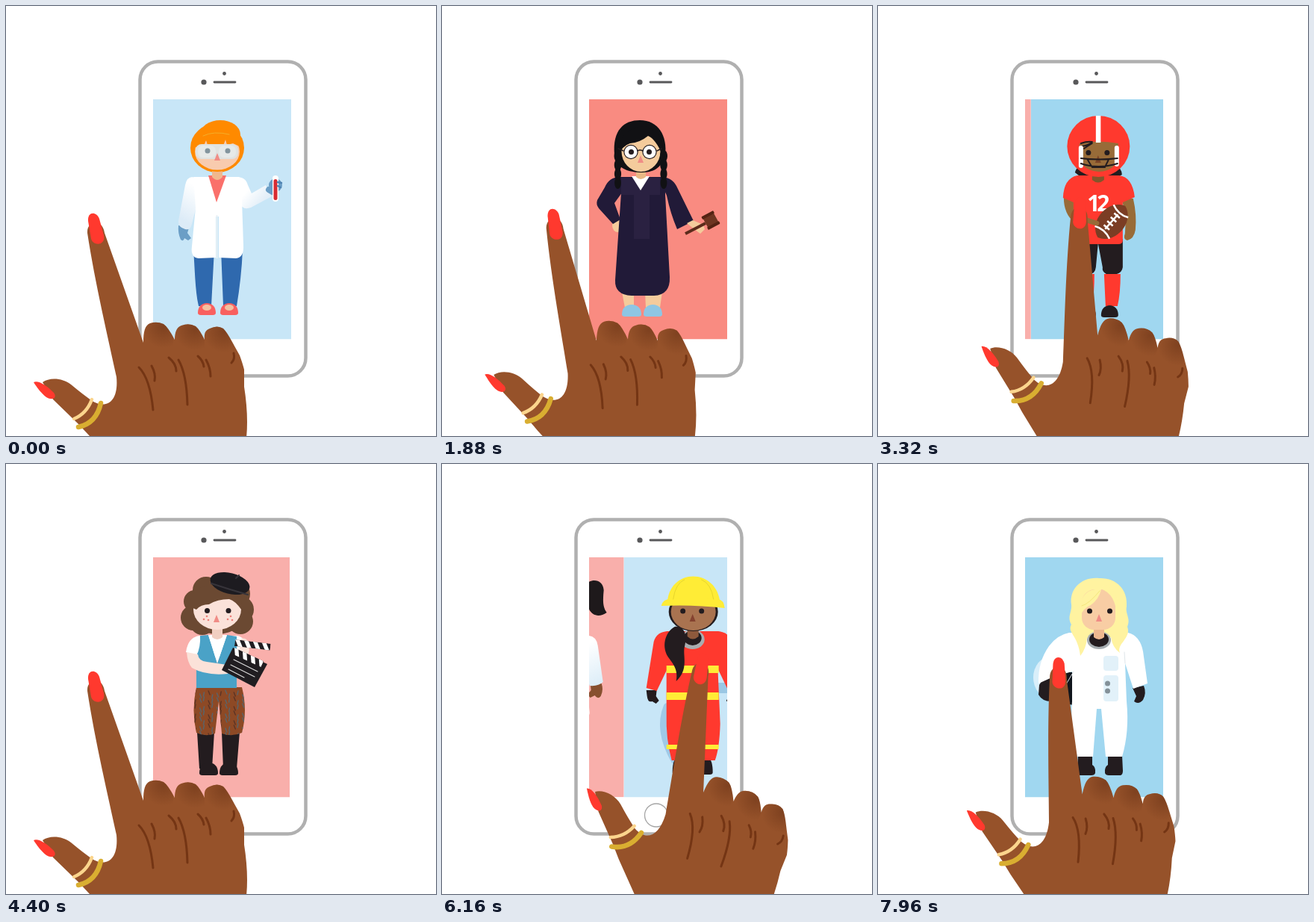
Animation of 576 by 576 pixels, one loop 8000 ms. Source, as an HTML page with a canvas:

```html
<!DOCTYPE html>
<html lang="en">
<head>
<meta charset="utf-8">
<title>Swiping through careers</title>
<style>
html, body { margin: 0; width: 100%; height: 100%; overflow: hidden; background: #fff; }
canvas { display: block; width: 576px; height: 576px; }
</style>
</head>
<body>
<canvas id="stage" width="576" height="576"></canvas>
<script>
const g = document.getElementById('stage').getContext('2d');
const LOOP = 8000, CYCLE = 1400, STEP = 40;
const RED = '#ff392e', WHITE = '#fff', INK = '#231c1f', CORAL = '#fa706b', BROWN = '#96522a';
const SKY = '#c8e6f7', BLUE = '#a0d7f0', PINK = '#f9afab', SALMON = '#f98b81';

// Drawing helpers
function shape(fill, d) { g.fillStyle = fill; g.fill(new Path2D(d)); }
function oval(fill, x, y, rx, ry = rx, turn = 0) {
  g.fillStyle = fill;
  g.beginPath();
  g.ellipse(x, y, rx, ry, turn, 0, Math.PI * 2);
  g.fill();
}
function box(fill, x, y, w, h, r = 0) {
  g.fillStyle = fill;
  g.beginPath();
  g.roundRect(x, y, w, h, r);
  g.fill();
}
function line(stroke, width, d, cap = 'round') {
  g.strokeStyle = stroke;
  g.lineWidth = width;
  g.lineCap = cap;
  g.lineJoin = 'round';
  g.stroke(new Path2D(d));
}
function shade(x0, y0, x1, y1, from, to) {
  const s = g.createLinearGradient(x0, y0, x1, y1);
  s.addColorStop(0, from);
  s.addColorStop(1, to);
  return s;
}
function mirror(axis, draw) {
  draw();
  g.save();
  g.translate(axis * 2, 0);
  g.scale(-1, 1);
  draw();
  g.restore();
}
function eyes(x1, x2, y, color = INK) {
  oval(color, x1, y, 3.5);
  oval(color, x2, y, 3.5);
}
function nose(x, y, color = '#f08c86') { shape(color, `M${x} ${y}l4 10h-8z`); }
function shoe(fill, x, y, w, h) {
  shape(fill, `M${x} ${y + h - 3}C${x} ${y + 5} ${x + 5} ${y} ${x + w / 2} ${y}S${x + w} ${y + 5} ${x + w} ${y + h - 3}Q${x + w} ${y + h} ${x + w - 4} ${y + h}H${x + 4}Q${x} ${y + h} ${x} ${y + h - 3}Z`);
}

function scientist() {
  oval('#ff8a00', 283, 190, 36, 33);
  oval('#ff8a00', 287, 172, 27, 19);
  shape('#2f69ae', 'M251 326H279L275 402H258C253 380 253 350 251 326ZM288 326H317C316 352 313 378 309 402H291Z');
  mirror(284, () => {
    shoe('#f9605f', 257, 398, 24, 16);
    oval('#f3c0a0', 269, 404, 6, 4);
  });
  shape('#6b9ec6', 'M231 294L246 294L243 304L248 311L244 314L239 311Q238 316 234 313Q230 304 231 294Z');
  shape(shade(234, 285, 260, 245, '#dcebf7', WHITE), 'M250 229Q242 229 240 240L231 288Q230 296 240 299Q247 301 249 292L262 240Z');
  shape(shade(345, 262, 325, 245, '#e2eef8', WHITE), 'M307 229Q321 228 324 240L329 251L348 240L356 255L328 270Q317 274 313 264L304 242Z');
  shape(WHITE, 'M251 229H312Q318 234 316 260L318 320Q319 337 308 338L285 337V282H281V337L258 338Q247 337 249 322L254 270Z');
  box('#e9f1f6', 281.5, 280, 2, 58);
  shape(CORAL, 'M271 227H295L282 263Z');
  shape('#f0b88e', 'M276 215H290V229Q283 237 276 229Z');
  oval('#ff8a00', 283, 197, 31, 25);
  oval('#f8cbae', 283, 195, 30, 24.5);
  shape('#ff8a00', 'M250 190C253 162 279 158 293 165C307 165 315 176 315 189L304 184L296 186L294 179L291 187L270 186L268 180L265 187Z');
  line('#f4ae2a', 1, 'M264 174Q278 167 299 172');
  box('#dfe2e1', 254, 185, 57, 20, 8);
  box('#e6e9e8', 257, 187, 24, 16, 7);
  box('#e6e9e8', 285, 187, 23, 16, 7);
  eyes(270, 297, 194, '#83949d');
  nose(283, 197);
  oval('#6b9ec6', 361, 240, 9, 9);
  line('#6b9ec6', 8, 'M352 246L357 249');
  box(WHITE, 357, 227, 8, 35, 4);
  box('#d92c32', 358.5, 232, 5, 28, 2.5);
  line('#4f84b2', 2.5, 'M364 236L369 237M364 241L368 243');
}

function judge() {
  const skin = '#f4cb9c', robe = '#211a38', hair = '#111114';
  shape(skin, 'M241 383H257V404H245ZM272 383H295L292 404H273Z');
  shoe('#8ec6e4', 241, 400, 26, 16);
  shoe('#8ec6e4', 270, 400, 25, 16);
  oval(skin, 235, 294, 7, 9);
  shape(robe, 'M238 229Q224 229 218 243L208 260Q206 266 210 271L229 292L239 286L231 264L244 246Z');
  shape(robe, 'M291 229Q307 228 314 241L337 288L315 299Q306 278 301 254Z');
  shape(skin, 'M328 291L336 287L350 293L352 299L346 305L338 299Z');
  shape(robe, 'M236 229H297Q303 238 299 252L305 363Q306 387 284 388H254Q231 387 232 367L240 250Z');
  shape('#2a2141', 'M240 230H292V253H278V312H257V253H240Z');
  shape(WHITE, 'M254 228H278L266 247Z');
  shape('#e9b985', 'M260 215H273V229Q266 235 260 229Z');
  shape(hair, 'M231 199C228 166 244 153 265 153C290 153 302 174 299 200C293 218 284 223 265 223C246 222 233 216 231 199Z');
  oval(skin, 266.5, 195, 26, 27);
  shape(hair, 'M236 194C238 163 272 155 282 166C293 171 298 186 295 199Q286 178 276 174Q265 183 252 184Q242 187 236 200Z');
  for (let i = 0; i < 4; i++) {
    oval(hair, 235.5, 201 + i * 12, 5 - i * .2, 8);
    oval(hair, 297, 201 + i * 12, 5 - i * .2, 8);
  }
  for (const x of [253, 278]) {
    oval(INK, x, 195.5, 9.7);
    oval(WHITE, x, 195.5, 8.5);
  }
  line(INK, 1.5, 'M262 194Q265 192 269 194M243 194L236 191M288 194L294 191');
  eyes(253.5, 277.5, 195.5);
  nose(266, 200);
  line('#5b2b1b', 4, 'M326 305L353 291', 'butt');
  g.save();
  g.translate(360, 287);
  g.rotate(-.5);
  box('#6e3521', -8, -8, 16, 16, 1);
  box('#542313', -9, -10, 18, 4, 1);
  box('#542313', -9, 6, 18, 4, 1);
  g.restore();
}

function player() {
  const skin = '#986b38';
  shape(INK, 'M257 312H320V350Q319 357 312 359H298Q292 356 293 350L287 318L284 350Q283 359 275 359H264Q257 356 257 345Z');
  shape(RED, 'M260 359H282Q282 385 279 402H265ZM295 359H317Q317 385 313 402H297Z');
  shoe(INK, 261, 401, 23, 16);
  shoe(INK, 291, 401, 23, 16);
  shape(skin, 'M241 257H255L261 276L281 284Q289 290 283 295Q276 299 255 290Q241 278 241 257Z');
  shape(skin, 'M319 258H334Q339 280 337 300Q335 312 326 314Q320 312 323 305L324 286Z');
  shape(INK, 'M256 223Q258 214 266 216L287 225L308 216Q318 214 319 226L304 234H270Z');
  shape(RED, 'M259 227H315Q333 229 336 256L320 263V314Q320 319 314 319H260Q254 318 254 313V263L240 257Q241 231 259 227Z');
  shape('#83562b', 'M279 215H295V233Q287 240 279 233Z');
  oval(RED, 287.5, 188, 42, 41);
  shape(skin, 'M262 184Q287 179 314 184V201Q311 221 288 222Q264 220 262 201Z');
  box(WHITE, 284, 147, 6.5, 36);
  line(INK, 2, 'M264 184Q272 181 279 182M265 188Q273 187 278 183M268 191Q274 187 279 184');
  box(WHITE, 261, 187, 6, 30, 3);
  box(WHITE, 309, 187, 6, 28, 3);
  eyes(274, 299, 196.5);
  nose(287, 200, '#7a4326');
  line(INK, 2, 'M264 204Q287 207 313 204M264 211Q287 219 313 211M273 206L279 216H296L301 206');
  g.fillStyle = WHITE;
  g.textAlign = 'center';
  g.font = 'bold extra-condensed 30px "Open Sans", "Noto Sans", "Liberation Sans", sans-serif';
  g.letterSpacing = '-4px';
  g.fillText('12', 285.5, 275);
  g.letterSpacing = '0px';
  g.save();
  g.translate(305, 289);
  g.rotate(-.85);
  shape('#7b3d24', 'M-28 0C-20 -24 20 -24 28 0C20 24 -20 24 -28 0Z');
  line(WHITE, 2.5, 'M-19 -13Q-13 0 -19 13M19 -13Q13 0 19 13M-13 0H13M-10 -5V5M-3 -5V5M4 -5V5M11 -5V5', 'butt');
  g.restore();
  line(skin, 7, 'M272 287L285 291');
}

function director() {
  const skin = '#fbe2d9', hair = '#6b4932';
  shape(INK, 'M256 359H279L276 408H259ZM289 359H313L309 408H291Z');
  shoe(INK, 259, 400, 25, 17);
  shoe(INK, 286, 400, 25, 17);
  const trousers = 'M255 299H316Q324 330 316 360Q303 366 289 361L285 318L280 361Q267 366 255 360Q248 330 255 299Z';
  shape('#8d4925', trousers);
  g.save();
  g.clip(new Path2D(trousers));
  for (let i = 0; i < 84; i++) {
    const x = 254 + i % 12 * 5.7, y = 303 + Math.floor(i / 12) * 9 + i * 5 % 7;
    line(i % 3 ? '#59646b' : '#5b3325', 1.4, `M${x} ${y}l${i % 2 ? 2 : -1} 5`);
  }
  g.restore();
  oval(hair, 283, 193, 42, 35);
  for (const [x, y, r] of [[268, 169, 18], [253, 184, 15], [251, 206, 17], [263, 212, 17], [306, 174, 21], [314, 195, 18], [314, 211, 17]])
    oval(hair, x, y, r);
  shape(WHITE, 'M259 230H309Q321 231 325 252L311 259H258L241 252Q244 232 259 230Z');
  shape('#4aa2c7', 'M260 230L271 229L283 267L296 229L309 231V300H255V257Q261 245 260 230Z');
  shape(WHITE, 'M271 229H296L283 267Z');
  shape(skin, 'M242 252L257 255Q258 264 269 265L296 269Q301 276 297 281Q268 284 249 273Q243 266 242 252Z');
  line(skin, 13, 'M318 240Q323 252 309 267');
  shape('#f1cfc1', 'M276 215H290V232Q283 238 276 232Z');
  oval(skin, 283, 195, 32, 27);
  shape(hair, 'M246 191C249 161 272 157 296 170C312 174 318 184 316 196Q307 183 299 181Q283 181 272 188Q261 188 255 195Z');
  oval('#1d1b20', 300, 160, 27, 14, .24);
  line('#37343a', 2, 'M308 153L312 149M275 160Q299 168 324 175');
  eyes(269.5, 298, 196.5);
  nose(282, 202);
  for (const x of [265, 297])
    for (const [dx, dy] of [[0, 4], [4, 0], [6, 5]]) oval('#ed7e78', x + dx, 204 + dy, 1.3);
  shape('#201d21', 'M304 246L350 268L333 299L289 276Z');
  line('#ddd', 1.1, 'M305 262L337 278M301 269L333 285M298 275L319 286');
  clapBar(307, 235, 48, .12);
  clapBar(306, 246, 43, .43);
}
function clapBar(x, y, length, turn) {
  g.save();
  g.translate(x, y);
  g.rotate(turn);
  g.beginPath();
  g.rect(0, 0, length, 9);
  g.clip();
  box('#201d21', 0, 0, length, 9);
  for (let i = 0; i < 5; i++) shape(WHITE, `M${i * 12} 0h6l5 9h-6z`);
  g.restore();
}

function firefighter() {
  const yellow = '#ffec36', skin = '#a97350';
  line('#9fc9e7', 10, 'M255 325Q242 357 265 397');
  box('#9ac7e4', 318, 293, 30, 14, 2);
  mirror(289, () => {
    shape(INK, 'M227 303H241L240 311L244 317L240 321L235 318Q229 320 228 311Z');
    shape(RED, 'M257 224Q241 224 237 238L227 300L241 304L262 260Z');
    shoe(INK, 262, 391, 25, 25);
  });
  shape(RED, 'M254 224H324Q331 250 323 280L326 348Q325 381 319 397H290L289 370L286 397H261Q253 368 254 335Z');
  for (const [y, h] of [[270, 10], [306, 10], [376, 6]]) box(yellow, 254, y, 70, h);
  oval('#a8adb0', 289, 235, 16, 13);
  oval(INK, 289, 233, 12, 10);
  shape('#8d593c', 'M282 215H297V231Q289 238 282 231Z');
  oval(INK, 290, 198, 33, 26);
  oval(skin, 290, 198, 30, 25);
  shape(yellow, 'M255 188C256 138 323 138 326 188Z');
  shape(yellow, 'M247 190Q249 181 259 181Q290 178 323 181Q331 182 332 193Q290 188 247 190Z');
  line('#e7d52c', 1, 'M263 181Q266 160 278 155M317 181Q314 160 301 155');
  eyes(276, 301, 197);
  nose(289, 201, '#84422f');
  shape(INK, 'M265 218C277 216 283 228 278 246C276 258 284 275 267 291C270 276 263 268 258 261C246 246 252 225 265 218Z');
}

function doctor() {
  const skin = '#87502f', hair = '#1e191b';
  mirror(284, () => {
    shape(hair, 'M256 164C249 152 231 153 230 169C231 181 232 191 226 199C239 208 252 201 252 183Z');
    shape(skin, 'M233 294H248L247 303L252 309L248 313L242 310Q238 316 234 311Q230 303 233 294Z');
    shape(skin, 'M256 355H277Q277 382 274 404H259Z');
    shoe('#f7423b', 258, 400, 25, 17);
    line(WHITE, 1.5, 'M266 404L275 410M275 404L266 410');
    shape('#14172d', 'M253 310H288L280 322L278 358Q265 363 255 356Z');
    shape(shade(235, 295, 260, 245, '#dcedf8', WHITE), 'M250 230Q240 231 238 243L231 292Q237 298 249 297L262 250Z');
  });
  box(CORAL, 270, 228, 28, 85);
  mirror(284, () => shape(WHITE, 'M250 230H272L274 338Q272 342 265 342Q249 342 249 333L254 282Z'));
  shape('#754326', 'M277 214H291V231Q284 238 277 231Z');
  oval(hair, 284, 187, 35, 32);
  oval(skin, 284, 196, 31, 25);
  shape(hair, 'M250 194C248 168 267 155 286 156C306 156 319 174 317 198Q309 183 298 178Q279 190 261 186Q255 190 250 194Z');
  eyes(270, 297, 196.5);
  nose(283, 201, '#b9343b');
  line('#777c82', 2.2, 'M273 229Q266 237 266 257M299 229Q304 245 300 270M300 271Q289 276 288 297M300 271Q309 281 304 300');
  oval('#a8b0b7', 266, 261, 5.5);
  oval('#d7edf7', 266, 261, 4);
  line(WHITE, 2, 'M288 288V298M306 288L304 300');
  oval(INK, 298, 301, 1.5);
}

function astronaut() {
  const hair = '#fff3a0';
  oval('#d9effa', 231, 286, 23, 28);
  shape('#10151c', 'M240 279H262V323L240 319Z');
  shape(INK, 'M216 296Q222 284 232 284V318Q220 318 215 309Z');
  shape(INK, 'M341 300L356 297Q360 307 355 316Q349 323 343 318L346 311Z');
  mirror(297.5, () => shape(INK, 'M268 390H287V403Q292 406 291 414Q290 417 286 417H270Q267 416 267 411Z'));
  shape(WHITE, 'M256 226H335Q351 230 355 251L361 294L342 301L331 267L333 318Q337 358 327 392H305L299 328H293L288 392H267Q257 351 260 318V278L235 285L215 294Q214 265 229 244Q240 229 256 226Z');
  line('#dfe6ea', 1, 'M262 278L252 295M331 267L330 252');
  box('#e2f1f9', 302, 257, 20, 20, 4);
  box('#e2f1f9', 302, 283, 20, 35, 4);
  oval('#849199', 307.5, 294, 3.5);
  oval('#849199', 307.5, 304, 3.5);
  shape(hair, 'M296 153C272 151 256 168 259 188C260 199 253 204 259 215C253 226 268 229 271 257Q279 247 280 233L312 232Q314 246 324 253C319 241 340 233 334 218C339 207 331 201 333 191C335 168 319 152 296 153Z');
  oval('#a6adb1', 296, 236, 16, 12);
  oval(INK, 296, 235, 13, 10);
  shape('#eeb990', 'M289 214H303V232Q296 238 289 232Z');
  box('#f8cda4', 273, 168, 45, 54, [18, 18, 16, 16]);
  shape(hair, 'M270 205C268 173 284 166 299 168Q296 181 285 189Q276 192 270 205ZM298 167Q319 174 320 205Q327 171 304 161Z');
  line('#f4e67c', 1, 'M273 190Q282 188 297 170');
  eyes(283.5, 310.5, 197);
  nose(296, 201);
}

const cards = [
  [SKY, scientist], [SALMON, judge], [BLUE, player], [PINK, director],
  [SKY, firefighter], [PINK, doctor], [BLUE, astronaut]
];

function ease(u) {
  u = Math.min(1, Math.max(0, u));
  return (1 - Math.cos(Math.PI * u)) / 2;
}

function card(index, slide, width) {
  const [color, person] = cards[index];
  box(color, 197 + slide, 125, width, 321.5);
  g.save();
  // An arriving person runs slightly ahead of the card.
  g.translate(slide < 0 ? Math.min(0, slide + 17) : slide, 0);
  person();
  g.restore();
}

function phone(index, slide) {
  box(WHITE, 179.5, 74.5, 222, 421, 24);
  g.save();
  g.beginPath();
  g.rect(197, 125, 185, 321.5);
  g.clip();
  if (slide >= 185) { index++; slide = 0; }
  card(index, slide, cards[index][0] === PINK && !slide ? 183 : 185);
  if (slide > 0) {
    g.beginPath();
    g.rect(197, 125, slide, 321.5);
    g.clip();
    card(index + 1, slide - 185, 185);
  }
  g.restore();
  g.strokeStyle = '#b0b0b0';
  g.lineWidth = 4.5;
  g.beginPath();
  g.roundRect(179.5, 74.5, 222, 421, 24);
  g.stroke();
  oval('#58585a', 265, 102, 3.6);
  oval('#58585a', 292.5, 90.5, 2.4);
  line('#58585a', 2.8, 'M279 102H307');
  g.lineWidth = 1.3;
  g.strokeStyle = '#a5a5a5';
  g.beginPath();
  g.arc(287, 470.5, 15.5, 0, Math.PI * 2);
  g.stroke();
}

const OUTLINE = 'M109 304C108 287 129 284 132 304L184 451C184 436 186 428 193 425Q202 422 211 426Q217 430 226 447C226 436 229 430 235 428Q245 424 254 429Q259 433 266 447C265 437 268 434 273 432Q283 427 291 432Q296 437 303 450L313 468Q317 479 319 487L319 510Q325 548 322 578L310 690H230L112 576L97 560L63 527L49 504C58 497 76 498 87 507Q105 522 117 530C136 540 151 529 148 497C138 450 119 370 109 304Z';
const CREASES = 'M178 484Q193 499 197 541M195 482Q201 493 199 502M218 471Q228 479 228 489M231 474Q242 493 243 534M257 469Q264 475 265 483M268 474Q274 485 274 496M305 465Q307 473 302 478';

function hand(dx) {
  g.save();
  g.translate(178 + dx, 494.5 - .16 * dx + .00034 * dx * dx);
  g.rotate(dx / 6.87 * Math.PI / 180);
  g.translate(-178, -494.5);
  shape(BROWN, OUTLINE);
  g.save();
  g.clip(new Path2D(OUTLINE));
  for (const [x, y] of [[203, 424], [245, 427], [284, 430]]) {
    const s = g.createRadialGradient(x + 8, y + 6, 1, x + 8, y + 6, 28);
    s.addColorStop(0, 'rgba(105,50,22,.5)');
    s.addColorStop(1, 'rgba(105,50,22,0)');
    box(s, x - 19, y - 4, 40, 42);
  }
  g.restore();
  line('#743514', 3, CREASES);
  shape(RED, 'M110 288C109 275 121 275 125 285L131 307C134 321 117 322 114 312Z');
  shape(RED, 'M37 504C43 501 54 508 64 518C69 525 62 529 54 524C47 519 41 510 37 504Z');
  line('#fbd58d', 4.5, 'M91 553Q108 546 115 527');
  line('#d9ae31', 6.5, 'M97 564Q121 559 127 532');
  g.restore();
}

function draw(t) {
  const turn = Math.floor(t / CYCLE), p = t % CYCLE;
  // The third swipe reaches out a little earlier and slower.
  const [start, span] = turn === 2 ? [368, 330] : [442, 195];
  const reach = Math.min(ease((p - start) / span), 1 - ease((p - 666) / 496));
  g.fillStyle = WHITE;
  g.fillRect(0, 0, 576, 576);
  phone(turn, 185 * ease((p - 494) / 197));
  hand(227 * reach);
}

const begin = performance.now();
function tick() {
  const t = (performance.now() - begin) % LOOP;
  draw(Math.floor(t / STEP) * STEP);
  requestAnimationFrame(tick);
}
tick();
</script>
</body>
</html>
```
